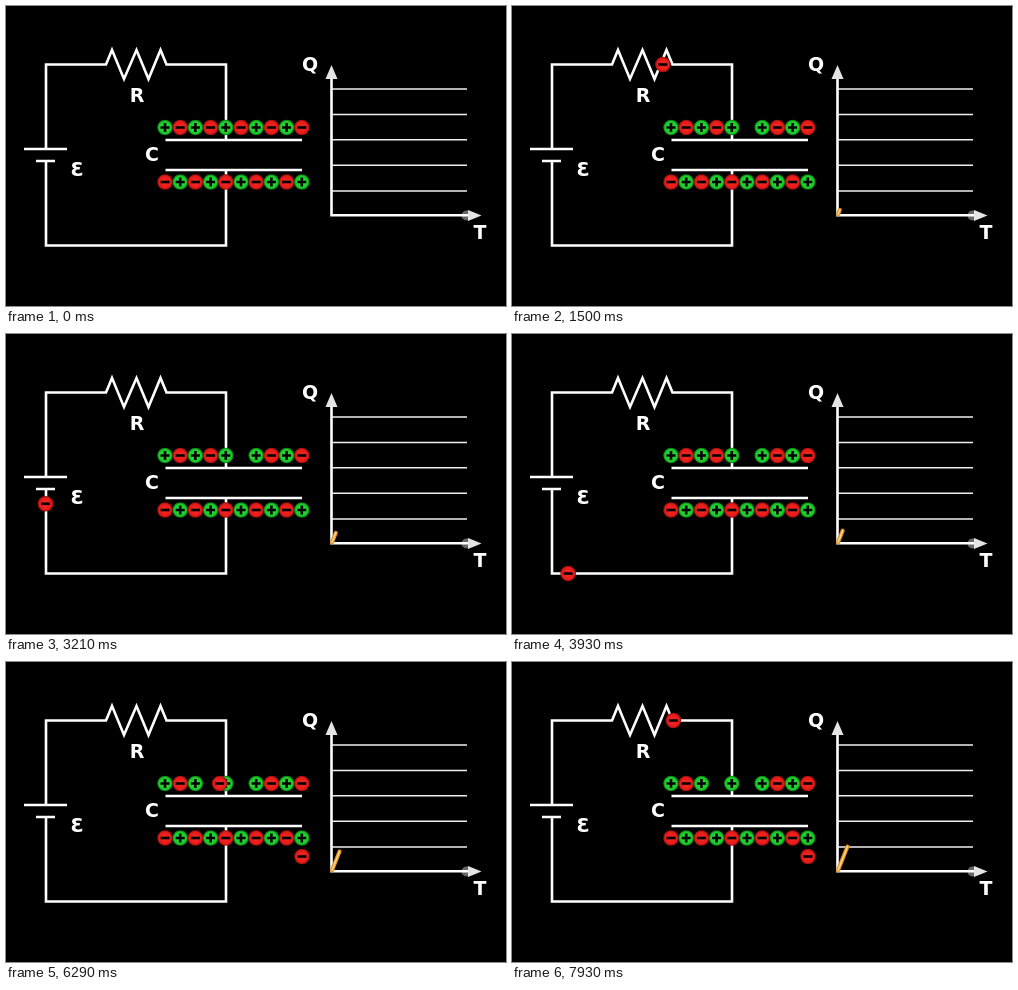
An HTML page for the animation above (8000 ms loop, 500 by 300 pixels).

```html
<!DOCTYPE html>
<html>
<head>
<meta charset="utf-8">
<style>
  html, body { margin: 0; width: 100%; height: 100%; overflow: hidden; background: #000; }
  svg { display: block; width: 500px; height: 300px; }
  text { font: bold 19px "DejaVu Sans", sans-serif; fill: #fff; text-anchor: middle; }
</style>
</head>
<body>
<svg viewBox="0 0 500 300">
  <defs>
    <radialGradient id="red">
      <stop offset="0" stop-color="#f62a26"/><stop offset=".75" stop-color="#e61c1a"/><stop offset="1" stop-color="#8c0c0c"/>
    </radialGradient>
    <radialGradient id="green">
      <stop offset="0" stop-color="#2ce03a"/><stop offset=".75" stop-color="#1cce2a"/><stop offset="1" stop-color="#0a6c12"/>
    </radialGradient>
    <g id="minus"><circle r="7.8" fill="url(#red)"/><path d="M-4.5 0H4.5" stroke="#000" stroke-width="2.6"/></g>
    <g id="plus"><circle r="7.8" fill="url(#green)"/><path d="M-4.5 0H4.5M0-4.5V4.5" stroke="#000" stroke-width="2.6"/></g>
  </defs>
  <rect width="500" height="300"/>

  <g fill="none" stroke="#fff" stroke-width="2.6">
    <path d="M40 143V58.5H100L106 44 118 73 130.500 44 142.500 73 154.500 44 160.500 58.500H220V134"/>
    <path d="M40 155V239.500H220V164"/>
    <path d="M18 143H61M30 155H49M159.500 134H296M159.500 164H296"/>
  </g>

  <circle cx="460.500" cy="209.500" r="5" fill="#666"/>
  <path d="M325.500 70V209.300H462" fill="none" stroke="#fff" stroke-width="2.6"/>
  <path d="M325.500 59L331.500 73H319.500ZM475.500 209.500L462 204V215Z" fill="#e4e4e4"/>
  <path d="M326 83H461M326 108.500H461M326 133.700H461M326 159.200H461M326 185H461" stroke="#eee" stroke-width="1.4"/>

  <text x="131" y="96">R</text>
  <text x="146" y="155">C</text>
  <text x="71" y="170">Ɛ</text>
  <text x="304" y="65">Q</text>
  <text x="474" y="233">T</text>

  <g id="curve" stroke-linecap="round">
    <path stroke="#e09020" stroke-width="4"/>
    <path stroke="#ffd890" stroke-width="1.5"/>
  </g>
  <g id="charges"></g>
</svg>
<script>
const LOOP = 8000;
const charges = document.getElementById('charges');
const curve = document.getElementById('curve');

function create(name, attrs) {
  const el = document.createElementNS('http://www.w3.org/2000/svg', name);
  for (const key in attrs) el.setAttribute(key, attrs[key]);
  return el;
}

function addCharge(sign, x, y) {
  const el = create('use', { href: '#' + sign, x, y });
  charges.append(el);
  return el;
}

for (let i = 0; i < 10; i++) {
  const x = 159 + i * 15.2;
  // The top charges at 3 and 5 are the ones that travel.
  if (i !== 3 && i !== 5) addCharge(i % 2 ? 'minus' : 'plus', x, 121.5);
  addCharge(i % 2 ? 'plus' : 'minus', x, 176);
}

// Each key is [time, distance along the route].
const travellers = [
  { route: 'M235 121.5H220V58.500H39.500V239.500H220V194.500H296',
    keys: [[210, 0], [1500, 147], [2430, 267], [3570, 417], [3930, 456], [5290, 638], [6070, 741]] },
  { route: 'M204.600 121.5H220V58.500H40',
    keys: [[6175, 0], [6290, 9], [7930, 137], [8000, 142]] }
].map(({ route, keys }) => ({
  path: create('path', { d: route }), keys, el: addCharge('minus', 0, 0)
}));

function distanceAt(keys, t) {
  if (t <= keys[0][0]) return 0;
  const i = keys.findIndex(key => key[0] > t);
  if (i < 0) return keys[keys.length - 1][1];
  const [t0, d0] = keys[i - 1], [t1, d1] = keys[i];
  return d0 + (d1 - d0) * (t - t0) / (t1 - t0);
}

function draw(now) {
  const t = now % LOOP;
  for (const { path, keys, el } of travellers) {
    const p = path.getPointAtLength(distanceAt(keys, t));
    el.setAttribute('x', p.x);
    el.setAttribute('y', p.y);
  }
  const k = t / 7930;
  curve.style.display = t < 210 ? 'none' : '';
  for (const line of curve.children)
    line.setAttribute('d', `M326 208.500L${326 + 9.5 * k} ${208.5 - 24 * k}`);
  requestAnimationFrame(draw);
}
requestAnimationFrame(draw);
</script>
</body>
</html>
```
